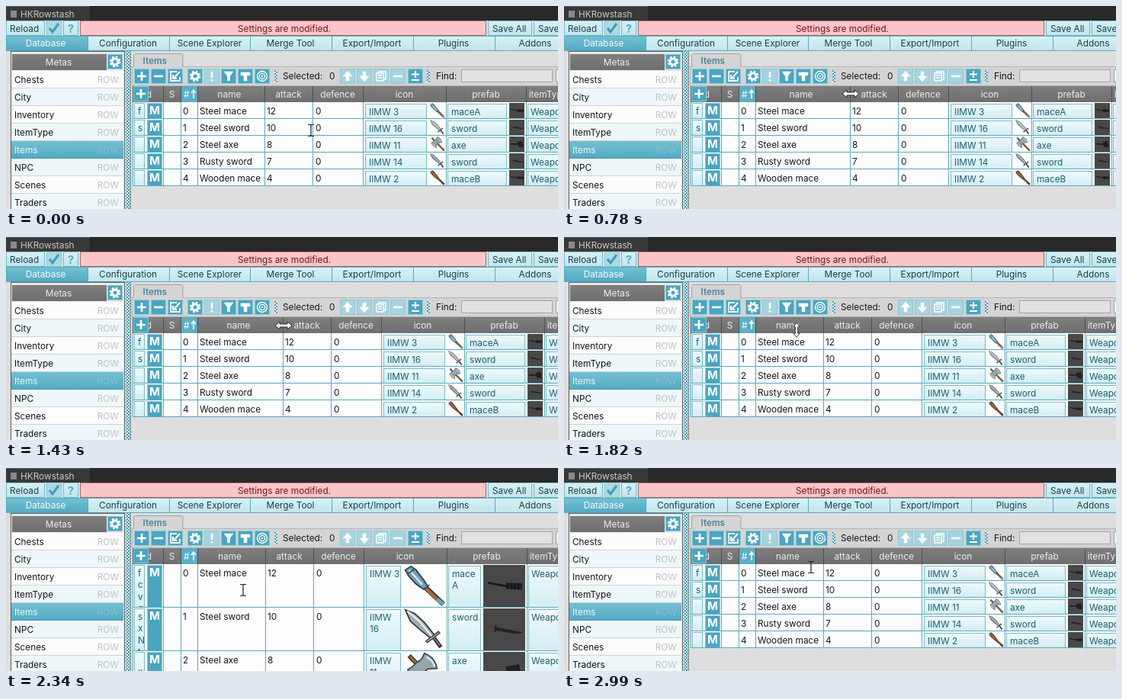
An HTML page that plays this animation: 724x266 px, repeating every 3120 ms.

```html
<!DOCTYPE html>
<html lang="en">
<head>
<meta charset="utf-8">
<title>Table editor</title>
<style>
html, body { margin: 0; width: 100%; height: 100%; overflow: hidden; background: #dedede; }
svg { display: block; }
#stage { width: 724px; height: 266px; }
text { font: 11.8px Inter, "Open Sans", sans-serif; white-space: pre; }
.semi { font-weight: 600; }
.big { font-weight: 700; font-size: 15px; }
</style>
</head>
<body>
<svg id="stage" viewBox="0 0 724 266">
  <defs>
    <linearGradient id="btn" x2="0" y2="1">
      <stop stop-color="#effafc"/><stop offset="1" stop-color="#d2edf2"/>
    </linearGradient>
    <linearGradient id="tool" x2="0" y2="1">
      <stop stop-color="#d8f1f5"/><stop offset="1" stop-color="#c2e5ec"/>
    </linearGradient>
    <linearGradient id="head" x2="0" y2="1">
      <stop stop-color="#7f7f7f"/><stop offset="1" stop-color="#6e6e6e"/>
    </linearGradient>
    <linearGradient id="sel" x2="0" y2="1">
      <stop stop-color="#74c0d3"/><stop offset="1" stop-color="#53a9c1"/>
    </linearGradient>
    <pattern id="grip" width="4" height="4" patternUnits="userSpaceOnUse">
      <rect width="4" height="4" fill="#d7eef3"/>
      <path d="M0 0h2v2h-2zM2 2h2v2h-2z" fill="#4aa0b8"/>
    </pattern>
  </defs>
  <g id="shell"></g>
  <g id="table"></g>
  <g id="cursor"></g>
</svg>
<script>
const TEAL = '#4aa5c0', LINE = '#5aa9be', INK = '#1d5f74', DARK = '#173f4c';
const $ = id => document.getElementById(id);

const rect = (x, y, w, h, fill, stroke) =>
  stroke
    ? `<rect x="${x + .5}" y="${y + .5}" width="${Math.max(0, w - 1)}" height="${Math.max(0, h - 1)}" fill="${fill}" stroke="${stroke}"/>`
    : `<rect x="${x}" y="${y}" width="${w}" height="${h}" fill="${fill}"/>`;
const text = (s, x, y, fill = '#151515', anchor = 'start', style = '') =>
  `<text x="${x}" y="${y}" fill="${fill}" text-anchor="${anchor}" class="${style}">${s}</text>`;
const path = (d, stroke, width = 1, fill = 'none', extra = '') =>
  `<path d="${d}" stroke="${stroke}" stroke-width="${width}" fill="${fill}" ${extra}/>`;
const crop = (x, y, w, h, body) =>
  `<svg x="${x}" y="${y}" width="${w}" height="${h}">${body}</svg>`;

// Glyphs on a 20 x 20 button
const glyphs = {
  plus: path('M10 4v12M4 10h12', '#fff', 2.6),
  minus: path('M4 10h12', '#fff', 2.6),
  edit: path('M12 4H4v12h12v-5', '#fff', 1.8) + path('M8 13L16 4M7 8v5h5', '#fff', 2.2),
  gear: '<circle cx="10" cy="10" r="4" fill="none" stroke="#fff" stroke-width="3"/>' +
    '<circle cx="10" cy="10" r="6.2" fill="none" stroke="#fff" stroke-width="2.4" stroke-dasharray="2.6 2.27"/>',
  alert: path('M10 4v8M10 14v2.5', '#fff', 2.6),
  funnel: path('M4 4h12l-4.5 6v6h-3v-6z', '#fff', .5, '#fff'),
  tee: path('M4 5h12v4h-4v7h-4v-7h-4z', '#fff', .5, '#fff'),
  target: '<circle cx="10" cy="10" r="6.5" fill="none" stroke="#fff" stroke-width="1.4"/>' +
    '<circle cx="10" cy="10" r="3.6" fill="none" stroke="#fff" stroke-width="1.4"/><circle cx="10" cy="10" r="1.2" fill="#fff"/>',
  up: path('M10 3l6 7h-4v6h-4v-6h-4z', '#fff', .5, '#fff'),
  down: path('M10 17l6-7h-4v-6h-4v6h-4z', '#fff', .5, '#fff'),
  copy: path('M4 6h9v10h-9zM7 6V4h9v10h-3M6 9h5M6 12h5', '#fff', 1.4),
  plusminus: path('M10 3v9M5 7.5h10M5 15h10', '#fff', 2.2),
  check: path('M4 10l4 5l8-11', '#459ab3', 3)
};
const iconButton = (name, x, y, fill = TEAL) =>
  `<g transform="translate(${x} ${y})">${rect(0, 0, 20, 20, fill, '#8ccbdb')}${glyphs[name]}</g>`;
const button = (x, y, w, h, fill = 'url(#btn)') => rect(x, y, w, h, fill, '#76b9ca');
const toolButton = (label, x, w, pad) => button(x, 19, w, 20, 'url(#tool)') + text(label, x + pad, 34, DARK);

function drawShell() {
  let s = rect(0, 0, 724, 19, '#282828') + rect(0, 0, 110, 19, '#383838') + rect(0, 0, 110, 1, '#3a6c94') +
    rect(6, 6, 8, 9, '#8a8a8a') + text('HKRowstash', 19, 15, '#c8c8c8');

  // Command bar
  s += rect(0, 19, 724, 20, '#d3e8ed') + toolButton('Reload', 0, 51, 5) +
    iconButton('check', 53, 19, '#acdae5') + toolButton('', 75, 20, 0) +
    text('?', 85, 34.5, '#5bacc3', 'middle', 'big') +
    rect(97, 19, 533, 20, '#fcc5c8', '#a2686c') + text('Settings are modified.', 365, 33.5, '#74161d', 'middle') +
    toolButton('Save All', 632, 58, 6) + toolButton('Save', 692, 60, 6);

  // Main tabs
  ['Database', 'Configuration', 'Scene Explorer', 'Merge Tool', 'Export/Import', 'Plugins', 'Addons'].forEach((name, i) => {
    const x = Math.round(i * 106.8), on = i === 0;
    s += rect(x, 39, 108, 20, on ? 'url(#sel)' : 'url(#tool)', LINE) +
      text(name, x + (on ? 52 : 53), 53, on ? '#f4fcfd' : DARK, 'middle');
  });

  // Left list
  s += rect(0, 59, 724, 207, '#dedede') + rect(6, 59, 150, 220, '#e9e9e9', '#5c5c5c') +
    rect(8, 63, 124, 21, 'url(#head)') + text('Metas', 69, 78, '#eee', 'middle') + iconButton('gear', 133, 63);
  ['Chests', 'City', 'Inventory', 'ItemType', 'Items', 'NPC', 'Scenes', 'Traders'].forEach((name, i) => {
    const y = 85 + i * 23, on = name === 'Items';
    s += rect(7, y, 147, 23, on ? 'url(#sel)' : i % 2 ? '#eef8fa' : '#fcfcfc') +
      rect(7, y + 22, 147, 1, on ? '#4598b0' : '#d2d2d2') +
      text(name, 11, y + 15.5, on ? '#e8f8fb' : '#151515') +
      text('ROW', 148, y + 15.5, on ? '#86bfce' : '#c2c2c2', 'end');
  });
  s += rect(157, 59, 6, 207, 'url(#grip)') + rect(163, 59, 1, 207, '#8b8b8b');

  // Right panel
  s += rect(165, 79, 559, 26, '#d4d4d4', '#b4b4b4') +
    path('M167.5 80V64l2-1.500H230l2 1.500V80', '#a2a2a2', 1, '#d4d4d4') + text('Items', 179.5, 76, '#4d8697', 'start', 'semi');
  const pale = '#a6d3df';
  [['plus', 168], ['minus', 190], ['edit', 212], ['gear', 238], ['alert', 260, pale], ['funnel', 282], ['tee', 304],
   ['target', 326], ['up', 438, pale], ['down', 460, pale], ['copy', 482, pale], ['minus', 504, pale], ['plusminus', 527]]
    .forEach(([name, x, fill]) => s += iconButton(name, x, 82, fill));
  s += [352, 552].map(x => rect(x, 84, 4, 16, 'url(#grip)')).join('') +
    text('Selected:', 363, 95.5) + text('0', 424, 95.5) + text('Find:', 564, 95.5) +
    rect(597, 83, 120, 17, '#e2e2e2', '#a5a5a5') + rect(721, 83, 4, 17, '#eee', '#a5a5a5');
  $('shell').innerHTML = s;
}

const rows = [
  { id: 'fcvqTe', name: 'Steel mace', attack: 12, icon: 'IIMW 3', prefab: 'maceA', art: 'mace' },
  { id: 'sxNtRa', name: 'Steel sword', attack: 10, icon: 'IIMW 16', prefab: 'sword', art: 'sword' },
  { id: ' xKdwu', name: 'Steel axe', attack: 8, icon: 'IIMW 11', prefab: 'axe', art: 'axe' },
  { id: ' lHpmz', name: 'Rusty sword', attack: 7, icon: 'IIMW 14', prefab: 'sword', art: 'rusty' },
  { id: ' gBnyo', name: 'Wooden mace', attack: 4, icon: 'IIMW 2', prefab: 'maceB', art: 'wood' }
];

// Weapons on a 66 x 66 square
const mace = (head, light, grip, tip) =>
  path('M30 32L62 62', '#2c2c2c', 8) + path('M30 32L52 54', grip, 5) + path('M52 54L62 62', tip, 6) +
  path('M2 8L11 2L19 8L32 25L38 35L30 38L19 30L7 17Z', '#2c3a42', 2, head) +
  path('M8 8L29 31', light, 3) + path('M5 15L17 6M31 39L40 31', '#2f505e', 2);
const sword = (blade, edge) =>
  path('M2 2L17 8L33 23L48 42L42 47L26 34L10 20Z', '#34393b', 2, blade) + path('M5 4L24 20L44 44', edge, 2.5) +
  path('M35 53L56 37', '#323232', 5) + path('M36 52L55 38', '#a5b0b2', 2) +
  path('M47 46L58 61', '#2c2c2c', 6) + path('M47 46L57 59', '#707a7c', 2.5);
const art = {
  mace: mace('#6f9fb3', '#cfe5ed', '#a56b38', '#75a3b5'),
  sword: sword('#9fb0b4', '#f1f5f5'),
  axe: path('M8 6L62 61', '#3a2a1c', 7) + path('M9 7L60 59', '#9a6a3b', 4) +
    path('M6 28Q16 22 20 16Q28 14 32 2Q49 8 52 26L37 27L27 36L28 49Q12 43 6 28Z', '#3a4448', 2, '#93a5ad') +
    path('M35 8Q46 13 48 23M10 30Q15 40 25 44', '#dbe5e8', 3),
  rusty: sword('#8d9a9a', '#d9dddc'),
  wood: mace('#8a4f2c', '#c08858', '#8c5a34', '#5e3a22')
};
const model = {
  mace: path('M7 28L40 34', '#191919', 3.5) + path('M36 33L61 34', '#171717', 10, 'none', 'stroke-dasharray="5 .6"'),
  sword: path('M6 28L19 31', '#5e382f', 4) + path('M20 26L18 37', '#242424', 2.5) + path('M20 30L61 38L48 39L20 34Z', '#191919', 1, '#2a2422'),
  axe: path('M6 32L60 34', '#191919', 5) + path('M36 24L56 20L60 46L40 44Z', '#151515', 1, '#202020')
};
model.rusty = model.sword;
model.wood = model.mace;
const scaled = (body, x, y, size) =>
  `<g transform="translate(${x} ${y}) scale(${size / 66})">${body}</g>`;

const pen = document.createElement('canvas').getContext('2d');
function wrap(s, width) {
  pen.font = '11.8px Inter, "Open Sans", sans-serif';
  const fits = t => pen.measureText(t).width <= width;
  const lines = [];
  let line = '';
  for (const word of s.split(' ')) {
    if (line && fits(line + ' ' + word)) { line += ' ' + word; continue; }
    if (line) lines.push(line);
    line = '';
    for (const c of word) {
      if (line && !fits(line + c)) { lines.push(line); line = ''; }
      line += c;
    }
  }
  return [...lines, line];
}
const textButton = (lines, x, y, w, h, pad) =>
  button(x, y, w, h) + crop(x, y, w, h - 1, lines.map((t, i) => text(t, pad, 15 + i * 15.3, INK)).join(''));

function drawTable(edge, h) {
  const shift = edge - 339;
  const at = x => x + shift;
  const cols = [166, 206, 229, 251, ...[339, 402, 468, 577, 682, 780].map(at)];
  const titles = ['id', 'S', '', 'name', 'attack', 'defence', 'icon', 'prefab', 'itemType'];
  const size = h - 2;
  let s = rect(166, 105, 558, 21, 'url(#head)') + rect(229, 105, 22, 21, '#5cafc6');
  titles.forEach((t, i) => {
    const mid = i === 8 ? at(711) : (cols[i] + cols[i + 1]) / 2 - (i === 3 ? 2 : 0);
    s += text(t, mid, 119.5, '#eee', 'middle');
  });
  s += text('#', 233, 119.5, '#fff') + path('M246 121v-10M243 114l3-4l3 4', '#fff', 1.6);

  rows.forEach((r, i) => {
    const y = 126 + i * h, base = y + 16;
    if (y > 266) return;
    s += rect(166, y, 558, h, '#fdfdfd') + textButton([...r.id], 168, y + 1, 14, size + 1, 5) +
      rect(185, y + 1, 20, size + 1, TEAL, '#8ccbdb') +
      text('M', 195, y + 16, '#fff', 'middle', 'big') +
      text(i, 232, base) + text(r.name, 254, base) + text(r.attack, at(342), base) + text('0', at(406), base) +
      textButton(wrap(r.icon, 96 - size), at(471), y + 2, 101 - size, size, 5) +
      scaled(art[r.art], at(576) - size, y + 1, size) +
      textButton(wrap(r.prefab, 92 - size), at(579), y + 2, 98 - size, size, 5) +
      rect(at(680) - size, y + 1, size, size, '#484848') + scaled(model[r.art], at(680) - size, y + 1, size) +
      textButton(['Weapon'], at(684), y + 2, 90, size, 4) + rect(166, y + h - 1, 558, 1, LINE);
  });
  const bottom = 126 + rows.length * h;
  cols.forEach(x => s += rect(x, 105, 1, 21, '#505050') + rect(x, 126, 1, bottom - 126, LINE));
  s += iconButton('plus', 167, 105);
  $('table').innerHTML = crop(0, 0, 724, 266, s);
}

const arrows = 'M-11 0L-5-5V-2H5V-5L11 0L5 5V2H-5V5Z';
const cursors = {
  beam: path('M-4-7.500h3l1 1l1-1h3M0-7V7M-4 7.500h3l1-1l1 1h3', '#222', 1.2),
  wide: path(arrows, '#222', 1, '#fff'),
  tall: path(arrows, '#222', 1, '#fff', 'transform="rotate(90) scale(.85)"')
};

// step, cursor x, cursor y, right edge of the name column, row height
const poses = [
  [0, 400, 163, 339, 22], [3, 343, 117, 339, 22], [4, 340, 115, 339, 22],
  [8, 412, 115, 411, 22], [9, 411, 115, 410, 22], [12, 341, 116, 340, 22],
  [14, 305, 122, 340, 22], [16, 308, 172, 340, 68], [17, 309, 172, 340, 68],
  [20, 315, 136, 340, 34], [22, 320, 126, 340, 22], [23, 324, 130, 340, 22]
];
const STEP = 130, STEPS = 24;

function poseAt(step) {
  const k = Math.max(1, poses.findIndex(p => p[0] >= step));
  const a = poses[k - 1], b = poses[k], t = (step - a[0]) / (b[0] - a[0]);
  return a.map((v, i) => Math.round(v + (b[i] - v) * t)).slice(1);
}

let shown = -1;
function show(step) {
  if (step === shown) return;
  shown = step;
  const [x, y, edge, h] = poseAt(step);
  const kind = step < 3 || step > 14 ? 'beam' : step < 13 ? 'wide' : 'tall';
  drawTable(edge, h);
  $('cursor').innerHTML = `<g transform="translate(${x} ${y})">${cursors[kind]}</g>`;
}

drawShell();
show(0);
const start = performance.now();
function tick() {
  show(Math.floor((performance.now() - start) / STEP) % STEPS);
  requestAnimationFrame(tick);
}
requestAnimationFrame(tick);
</script>
</body>
</html>
```
